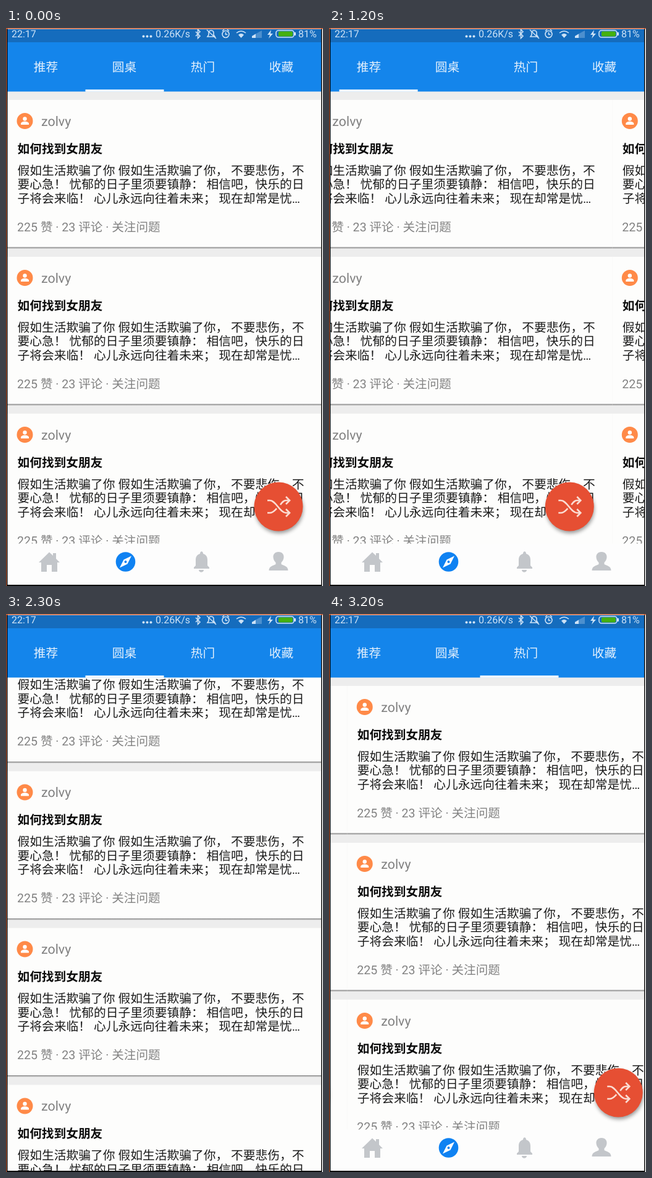
An HTML page for the animation above (3300 ms loop, 513 px wide and 900 px high).

```html
<!DOCTYPE html>
<html lang="zh-CN">
<head>
<meta charset="utf-8">
<style>
  html, body { margin: 0; width: 100%; height: 100%; overflow: hidden; background: #fff; }
  svg { display: block; width: 100%; height: 100%; }
  text { font: 19.7px Roboto, "Noto Sans CJK SC", "Noto Sans CJK", sans-serif; white-space: pre; text-rendering: geometricPrecision; }
  .title { font-weight: 700; fill: #0c0c0c; }
  .body text { font-size: 19.75px; fill: #1a1a1a; }
  .name { font-size: 21.4px; fill: #808080; }
  .stats { font-size: 19.6px; fill: #828282; }
  #tabs { fill: #e4f0fc; text-anchor: middle; }
  .status text { font-size: 16px; fill: #cde2f6; }
  .line { fill: none; stroke: #cde2f6; stroke-width: 1.6; }
</style>
</head>
<body>
<svg viewBox="0 0 513 900">
  <defs>
    <clipPath id="screen"><path d="M2 2H510V898H2Z"/></clipPath>
    <filter id="blur" x="-30%" y="-30%" width="160%" height="160%"><feGaussianBlur stdDeviation="3"/></filter>
    <linearGradient id="edge" x2="0" y2="1">
      <stop stop-color="#7c7c7c"/><stop offset=".4" stop-color="#a8a8a8"/><stop offset="1" stop-color="#ededed"/>
    </linearGradient>
    <g id="card">
      <path d="M2 0H510V238H2Z" fill="#fdfdfc"/>
      <path d="M2 237.5H510V240.5H2Z" fill="url(#edge)"/>
      <circle cx="30.5" cy="34" r="13" fill="#ff8a48"/>
      <g fill="#fff"><circle cx="30.5" cy="30.5" r="3.2"/><path d="M24 40v-1.5c0-5 13-5 13 0V40z"/></g>
      <text class="name" x="57" y="42">zolvy</text>
      <text class="title" x="18.5" y="86">如何找到女朋友</text>
      <g class="body">
        <text x="18.5" y="120.5">假如生活欺骗了你 假如生活欺骗了你， 不要悲伤，不</text>
        <text x="18.5" y="143.2">要心急！ 忧郁的日子里须要镇静： 相信吧，快乐的日</text>
        <text x="18.5" y="165.9">子将会来临！ 心儿永远向往着未来； 现在却常是忧…</text>
      </g>
      <text class="stats" x="18" y="212">225 赞 · 23 评论 · 关注问题</text>
    </g>
    <g id="fab">
      <circle cx="442" cy="776" r="39" opacity=".4" filter="url(#blur)"/>
      <circle cx="441" cy="772" r="39.5" fill="#e64f33"/>
      <path transform="translate(441 772)" fill="none" stroke="#fbdcd2" stroke-width="2.6"
        d="M-18-10h4C-4-10 2 10 12 10h5M-18 10h4C-9 10-6 6-3 3M3-3C6-7 8-10 12-10h5M12-16l6 6-6 6M12 4l6 6-6 6"/>
    </g>
  </defs>

  <g clip-path="url(#screen)">
    <path d="M0 0H513V900H0Z" fill="#ededed"/>
    <g id="pages"></g>

    <g id="nav">
      <path d="M2 831.5H510V898H2Z" fill="#fdfdfd"/>
      <g fill="#c3c6ca">
        <path d="M53 862L70 845.5l6 5.5v-4h5v9l6 6h-4v15h-9V866h-8v11h-9V862z"/>
        <path d="M304 872v-2l3-3v-9c0-6 3-9 7-10 0-5 5-5 5 0 4 1 7 4 7 10v9l3 3v2zM312 874h8c0 5-8 5-8 0z"/>
        <path d="M441 845c6 0 9 4 8.500 9-.5 4-2 6-4 8v3c4 2 11 3 11 10h-31c0-7 7-8 11-10v-3c-2-2-3.500-4-4-8-.5-5 2.500-9 8.500-9z"/>
      </g>
      <circle cx="193.500" cy="861" r="15.800" fill="#0f82f2"/>
      <path d="M203 851.500l-6.500 13-12.500 6 6.500-13z" fill="#fff"/>
      <circle cx="193.500" cy="861" r="2" fill="#0f82f2"/>
    </g>

    <path d="M2 23H510V102.400H2Z" fill="#1485eb"/>
    <path d="M2 0H510V23H2Z" fill="#156cbd"/>
    <g id="tabs"></g>
    <path id="bar" d="M128.500 99.200h127v3.500h-127z" fill="#fff"/>

    <g class="status">
      <text x="9" y="15.300">22:17</text>
      <text x="242" y="15.300">0.26K/s</text>
      <text x="473" y="15.300">81%</text>
      <g fill="#cde2f6">
        <circle cx="222.500" cy="13.500" r="2"/><circle cx="228.500" cy="13.500" r="2"/><circle cx="234.500" cy="13.500" r="2"/>
        <path d="M376 11q4.500-4 9 0l-4.500 5z"/>
        <path d="M429 3l-6 8h4l-2 6 7-8h-4z"/>
        <path d="M466 7h3v5h-3z"/>
        <path d="M398 16v-3l6-3.500V16z"/><path d="M404 9.500L414 4v12h-10z" opacity=".3"/>
      </g>
      <path class="line" d="M307 6l7 7-3.500 3.500v-14L314 6l-7 7M326 14h12l-2-3V7c-1-4-7-4-8 0v4zM325 3l15 14M373 8q7.500-6 15 0M350 5l3-2.500M361 5l-3-2.500M355.500 7v3.500h3"/>
      <circle class="line" cx="355.500" cy="10" r="5.500"/>
      <rect class="line" x="437" y="4" width="29" height="11" rx="4"/>
      <rect x="441" y="5.500" width="23" height="8" rx="2" fill="#45b010"/>
    </g>
  </g>
  <path d="M0 0H2.500V900H0ZM510 0h1.500V900H510ZM0 898H511.500V900H0Z" fill="#0a0a0a"/>
  <path d="M0 0H513V1.600H1V900H0Z" fill="#c8623c"/>
</svg>
<script>
const $ = id => document.getElementById(id);
const LOOP = 3300, PAGE = 508, TAB = PAGE / 4, CARD = 253, SCROLL = 270;

// Soft step from 0 to 1, centred on mid; a larger width is slower.
const glide = (t, mid, width) => 1 / (1 + Math.exp((mid - t) / width));

// Slow drag to the left tab, a flick back, then a flick to the right tab.
const swipe = t => PAGE * (glide(t, 1020, 80) - glide(t, 1462, 52) - glide(t, 3111, 31));
// The list scrolls down and returns; the bottom controls hide meanwhile.
const scroll = t => SCROLL * (glide(t, 2316, 55) - glide(t, 2748, 35));
const hide = t => glide(t, 2130, 20) - glide(t, 2600, 20);

const move = (el, x, y) => el.setAttribute('transform', `translate(${x} ${y})`);

$('tabs').innerHTML = ['推荐', '圆桌', '热门', '收藏']
  .map((name, i) => `<text x="${64.5 + i * TAB}" y="70">${name}</text>`).join('');

const cards = [0, 1, 2, 3, 4].map(i => `<use href="#card" y="${116 + i * CARD}"/>`).join('');
$('pages').innerHTML = `<g><g>${cards}</g><use href="#fab"/></g>`.repeat(3);
const pages = [...$('pages').children];

function draw(t) {
  const x = swipe(t), hidden = hide(t);
  pages.forEach((page, i) => move(page, x + (i - 1) * PAGE, 0));
  move(pages[1].firstChild, 0, -scroll(t));
  move(pages[1].lastChild, 0, hidden * 175);
  move($('nav'), 0, hidden * 70);
  move($('bar'), -swipe(t - 16) / 4, 0); // the tab bar trails the page slightly
}

// The screen rests at first, then refreshes ten times a second.
function refreshTime(t) {
  if (t < 700) return 0;
  return t < 900 ? 700 : Math.floor(t / 100) * 100;
}

let start;
function frame(now) {
  start ??= now;
  draw(refreshTime((now - start) % LOOP));
  requestAnimationFrame(frame);
}
draw(0);
requestAnimationFrame(frame);
</script>
</body>
</html>
```
